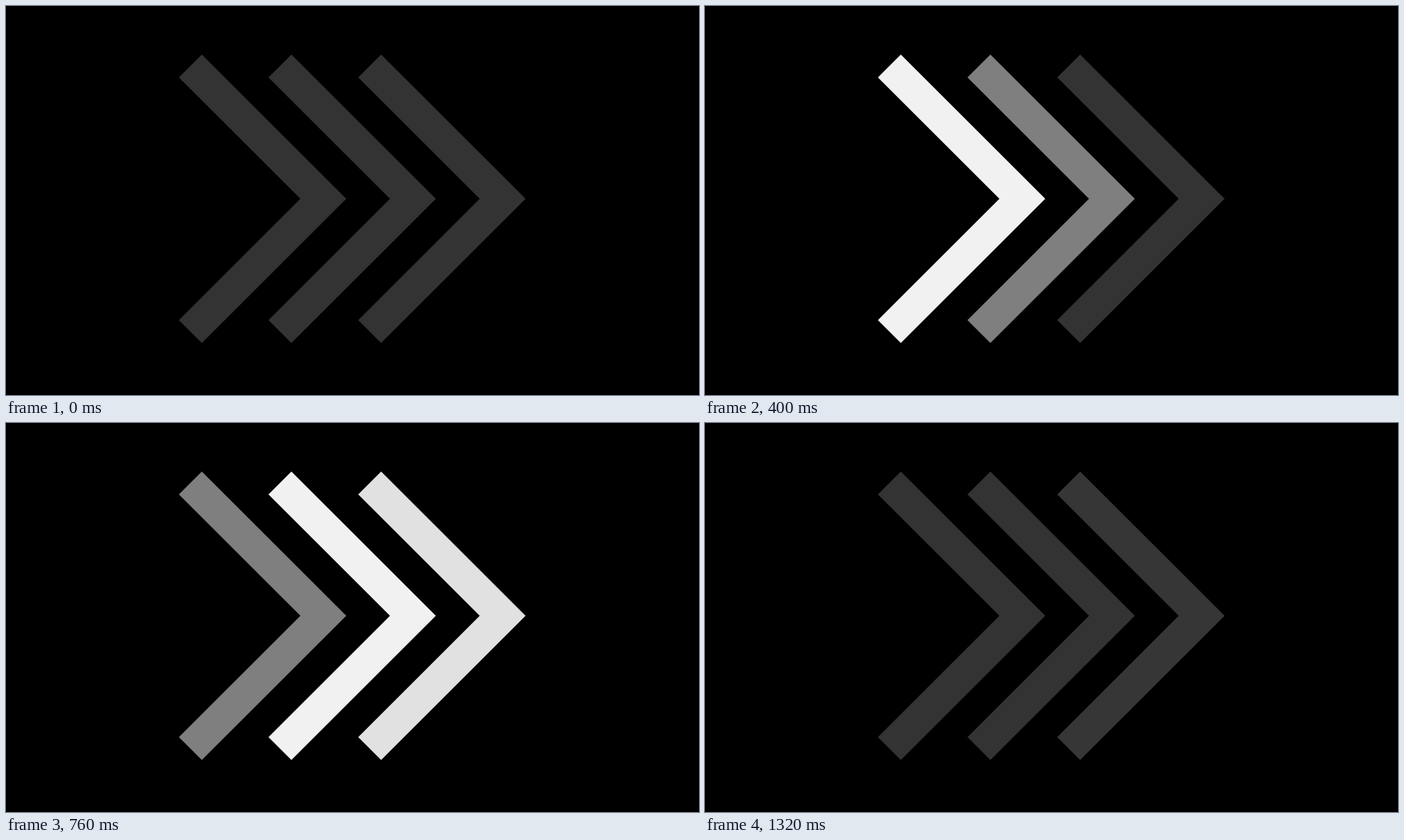
Recreate the animation shown at these times as an HTML page. Size 998 by 561 pixels, loop 1520 ms.

```html
<!DOCTYPE html>
<html lang="en">
<head>
<meta charset="utf-8">
<title>Chevrons</title>
<style>
  html, body { margin: 0; width: 100%; height: 100%; overflow: hidden; background: #000; }
  svg { display: block; width: 100%; height: 100%; }
</style>
</head>
<body>
<svg viewBox="0 0 998 561">
  <defs>
    <path id="chevron" d="M282 70 490 278 282 486 249 453 424 278 249 103Z"/>
  </defs>
  <use href="#chevron"/>
  <use href="#chevron" x="129"/>
  <use href="#chevron" x="258.2"/>
</svg>
<script>
  const LOOP = 1520, STEP = 40, DELAY = 200, PULSE = 960;
  const DIM = 51, BRIGHT = 255;
  const chevrons = [...document.querySelectorAll('use')];

  // One soft pulse from dim to bright and back.
  function shade(t) {
    if (t < 2 * STEP) return DIM;
    const phase = Math.min(t, PULSE - STEP) / PULSE;
    const wave = (1 - Math.cos(2 * Math.PI * phase)) / 2;
    return Math.round(DIM + (BRIGHT - DIM) * wave);
  }

  // The first two chevrons settle fully; the last keeps its final step until the loop restarts.
  function draw(ms) {
    const t = Math.floor((ms % LOOP) / STEP) * STEP;
    chevrons.forEach((chevron, i) => {
      const local = t - i * DELAY;
      const v = i < 2 && local >= PULSE ? DIM : shade(local);
      chevron.setAttribute('fill', `rgb(${v},${v},${v})`);
    });
  }

  const start = performance.now();
  function tick() {
    draw(performance.now() - start);
    requestAnimationFrame(tick);
  }
  draw(0);
  requestAnimationFrame(tick);
</script>
</body>
</html>
```
